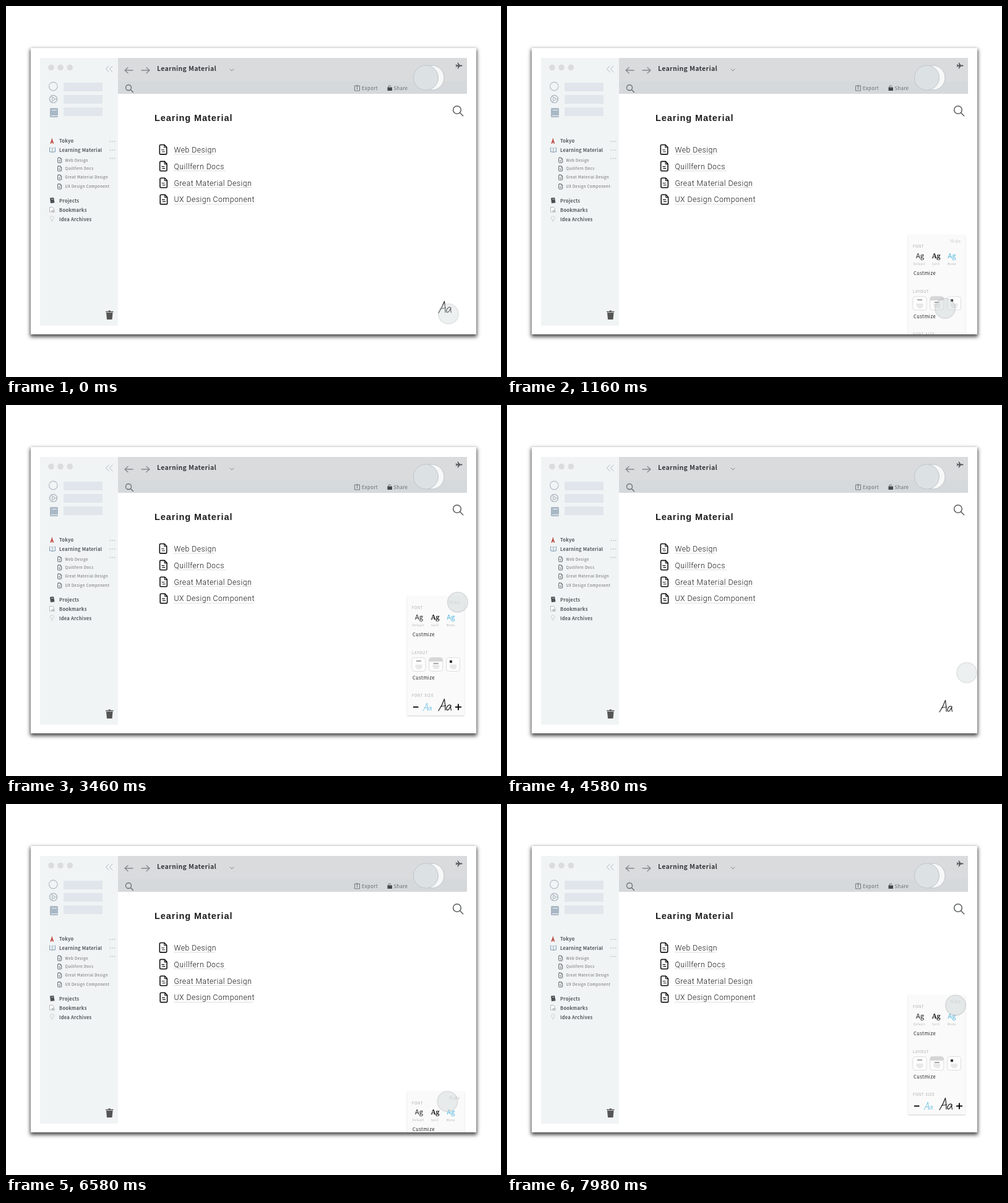
An HTML page that plays this animation: 800x600 px, repeating every 8 s.

```html
<!DOCTYPE html>
<html lang="en">
<head>
<meta charset="utf-8">
<title>Notes app with a type panel</title>
<style>
html, body { margin: 0; width: 100%; height: 100%; overflow: hidden; background: #fff }
svg { position: absolute; left: 0; top: 0; display: block }
text { font-family: "Noto Sans CJK JP", "Noto Sans CJK SC", "Noto Sans CJK", "Noto Sans", sans-serif; white-space: pre }
.window { position: absolute; left: 40px; top: 68px; width: 720px; height: 463px; background: #fff;
  box-shadow: 0 3px 6px 1px rgba(0,0,0,.72) }
.line { fill: none; stroke-linecap: round; stroke-linejoin: round }
.nav { font-size: 7.5px; font-weight: 700; letter-spacing: .27px; fill: #53585b }
.sub { font-size: 6px; letter-spacing: .48px; fill: #666 }
.tool { font-size: 7.6px; letter-spacing: .5px; fill: #62676a }
.item { font: 300 12.2px Roboto, "Liberation Sans", sans-serif; letter-spacing: .5px; fill: #111 }
.label { font-size: 6px; letter-spacing: .65px; fill: #aaa }
.tiny { font-size: 4.4px; letter-spacing: .6px; fill: #aaa }
.custom { font-size: 7.5px; letter-spacing: .5px; fill: #222 }
</style>
</head>
<body>
<div class="window"></div>
<svg width="800" height="600" viewBox="0 0 800 600">
  <defs>
    <clipPath id="stage"><path d="M40 68H760V531H40z"/></clipPath>
    <g id="doc" class="line">
      <path d="M2.5 .8H8.5L12.2 4.8V14.5Q12.2 16.2 10.5 16.2H2.5Q.8 16.2 .8 14.5V2.5Q.8 .8 2.5 .8z" stroke-width="1.6"/>
      <path d="M8.3 1V5H12M4 9H8M5 12H9" stroke-width="1.1"/>
    </g>
    <path id="aa" class="line" stroke-width="1.25"
      d="M0 19Q6 10 9.5 0Q11 9 11 18M3.5 12L11.5 11M20 10.5C16 7.5 11.5 14 13.5 17.5C15.5 19.5 18.5 14 20 10.5Q19 15 20.5 18"/>
    <path id="dots" d="M0 0h1.8m1.8 0h1.8m1.8 0h1.8" stroke="#bfc3c5" stroke-width="1.6"/>
    <filter id="soft" x="-10%" y="-10%" width="120%" height="120%">
      <feDropShadow dx="0" dy="1" stdDeviation="1.3" flood-color="#000" flood-opacity=".2"/>
    </filter>
  </defs>

  <!-- sidebar -->
  <path d="M55 84H181V517H55z" fill="#f1f4f5"/>
  <g fill="#dadcdd"><circle cx="73" cy="99.5" r="4.8"/><circle cx="88" cy="99.5" r="4.8"/><circle cx="103.300" cy="99.5" r="4.8"/></g>
  <path class="line" d="M166 97l-4.500 5 4.500 5m6-10l-4.500 5 4.500 5" stroke="#b2bac0"/>
  <g class="line" stroke="#b4bec6" stroke-width="1.2">
    <circle cx="76.300" cy="130" r="6.8"/>
    <circle cx="76.500" cy="150.500" r="6" stroke-width="1.7"/>
    <circle cx="76.500" cy="150.500" r="2.200"/>
    <path d="M78.500 150.500h4m-7-2l-2.200-3.600m2.200 7.600l-2.200 3.600"/>
  </g>
  <rect x="71" y="165" width="13" height="15" rx="1.500" fill="#a9b8c5"/>
  <path d="M74 168.500h8M73 177.500h11" stroke="#eef2f5"/>
  <path d="M93 124h63v14H93zM93 144h63v14H93zM93 164h63v14H93z" fill="#e0e6ec"/>
  <use href="#dots" x="167.500" y="219"/><use href="#dots" x="167.500" y="233"/><use href="#dots" x="167.500" y="246.500"/>
  <path d="M74.300 213l1 4 2 5.500h-1.800l-1.200-2.500-1.200 2.500h-1.800l2-5.500z" fill="#bd4b42"/>
  <path d="M70 228.500l5 1 5-1v7.500l-5 1-5-1z" fill="#7fa3bf"/>
  <path d="M71 229l4 1 4-1v6l-4 1-4-1z" fill="#eef0ef"/><path d="M75 230v6" stroke="#9baab4"/>
  <path d="M71 310.500l6-.7 1.500 8.500-6.500.7z" fill="#4c5052"/><path d="M73.500 312.500l2.500-.2" stroke="#ddd"/>
  <path d="M70.500 325.500h5l1.500 1.500v6h-6.500z" fill="#fff" stroke="#a3a8aa" stroke-width=".8"/>
  <path d="M73.500 330h5v4h-5z" fill="#c0c5c7"/>
  <path class="line" d="M72.800 345.500C69.500 342 72 340 74.300 340S79 342 75.800 345.500zm.4 2.300h2.200" stroke="#c5c9ca" stroke-width=".9"/>
  <path d="M162 496h10.500l-1 11h-8.500z" fill="#555"/><path d="M161 494.500h12.500M165.500 493.200h3.500" stroke="#555" stroke-width="1.500"/>
  <g id="nav"></g>

  <!-- header -->
  <path d="M181 84H745V122H181z" fill="#d9dbdd"/>
  <path d="M181 122H745V142H181z" fill="#d5d9dc"/>
  <path class="line" d="M205 104h-13l5-4.500m-5 4.500l5 4.500M219 104h13l-5-4.500m5 4.500l-5 4.500" stroke="#84898d" stroke-width="1.300"/>
  <text x="244" y="105" font-size="10.500" font-weight="700" letter-spacing=".33" fill="#36393b">Learning Material</text>
  <path class="line" d="M362 102l3 3 3-3" stroke="#83888b"/>
  <g class="line" stroke="#686d70">
    <circle cx="198" cy="132" r="4.500" stroke-width="1.300"/><path d="M201.500 135.500l4 4" stroke-width="1.400"/>
    <path d="M565.500 129H563.500v8h8v-8h-2M567.500 134.500v-6.500l-1.800 1.800m1.800-1.800l1.800 1.800" stroke-width=".9"/>
    <path d="M618 132v-2a2.200 2.200 0 0 1 4 0"/>
  </g>
  <path d="M616.500 131.500h7.500v5.500h-7.500z" fill="#44484a"/>
  <text class="tool" x="575" y="136">Export</text>
  <text class="tool" x="626.500" y="136" letter-spacing=".2">Share</text>
  <g stroke="#bfc6ca"><circle cx="688" cy="116" r="20" fill="#f7f8f8"/><circle cx="678.500" cy="116" r="20" fill="#dce1e4"/></g>
  <path d="M738 96.500l-1.500-.9h-3l-3-4h-1l1.200 4h-2l-1-1.400h-.9l.6 2.300-.6 2.300h.9l1-1.400h2l-1.200 4h1l3-4h3z" fill="#56595b"/>

  <!-- page -->
  <text x="240" y="185.500" style="font:700 14.500px 'Liberation Sans',Arial,sans-serif" letter-spacing=".95" fill="#1c1c1c">Learing Material</text>
  <g class="line" stroke="#5f6163" stroke-width="1.600"><circle cx="729" cy="168" r="6.300"/><path d="M733.700 172.700l5 5"/></g>
  <g id="list"></g>

  <g clip-path="url(#stage)">
    <use id="button" href="#aa" x="699" y="477.500" stroke="#333"/>
    <g id="panel">
      <path d="M648.500 0H740.500V193H648.500z" fill="#fafafa" filter="url(#soft)"/>
      <text x="716" y="13" font-size="7" letter-spacing=".6" fill="#c8c8c8">Hide</text>
      <text class="label" x="656" y="21">FONT</text>
      <text x="661" y="37.500" font-size="11" fill="#222">Ag</text>
      <text x="686.500" y="37.500" style="font:700 12px 'Noto Serif','Liberation Serif',serif;font-size:11px" fill="#222">Ag</text>
      <text x="712.500" y="37.500" font-size="11" fill="#4fb5de">Ag</text>
      <text class="tiny" x="657" y="48.500">Default</text>
      <text class="tiny" x="687" y="48.500">Serif</text>
      <text class="tiny" x="712" y="48.500">Mono</text>
      <text class="custom" x="657" y="64.500">Custmize</text>
      <text class="label" x="656" y="94">LAYOUT</text>
      <g id="tiles"></g>
      <path d="M683.500 106v-3q0-3.500 3.500-3.500h15q3.500 0 3.500 3.500v3z" fill="#d6d6d6"/>
      <path d="M717 104h4v4h-4z" fill="#333"/>
      <text class="custom" x="657" y="134.500">Custmize</text>
      <text class="label" x="656" y="162.500">FONT SIZE</text>
      <path d="M658 179.500h8.500M726 179.500h10M731 174.500v10" stroke="#111" stroke-width="1.900"/>
      <use href="#aa" transform="translate(674 173) scale(.66)" stroke="#62c0e2"/>
      <use href="#aa" x="699" y="166.500" stroke="#222"/>
    </g>
  </g>
  <g id="cursor">
    <circle r="16.200" fill="#cdd6d8" stroke="#b4b8ba" stroke-width="1.800"/>
  </g>
</svg>
<script>
const $ = id => document.getElementById(id);
const pages = ['Web Design', 'Quillfern Docs', 'Great Material Design', 'UX Design Component'];
const docIcon = (x, y, scale, color) =>
  `<use href="#doc" transform="translate(${x} ${y}) scale(${scale})" stroke="${color}"/>`;
const label = (cls, x, y, text) => `<text class="${cls}" x="${x}" y="${y}">${text}</text>`;

$('nav').innerHTML =
  [['Tokyo', 220.5], ['Learning Material', 235.7], ['Projects', 318], ['Bookmarks', 333], ['Idea Archives', 347.5]]
    .map(([text, y]) => label('nav', 86, y, text)).join('') +
  pages.map((text, i) => {
    const y = [251.5, 265, 279.3, 294][i];
    return docIcon(83.2, y - 6.6, .53, '#4b4f51') + label('sub', 95.5, y, text);
  }).join('');

$('list').innerHTML = pages.map((text, i) => {
  const y = 236.7 + 26.9 * i;
  return docIcon(247.5 + i * .3, y - 13, 1, '#111') + label('item', 271.5, y, text) +
    `<path d="M271 ${y + 3}H${[337, 355, 397, 399][i]}" stroke="#ddd"/>`;
}).join('');

$('tiles').innerHTML = [0, 1, 2].map(i => `<g transform="translate(${656 + i * 27.8} 99.500)">
  <rect width="22" height="22" rx="4" fill="#fdfdfd" stroke="#ddd"/>
  ${i < 2 ? `<path d="M7 ${i ? 9.5 : 5.5}h8" stroke="#777" stroke-width="1.300"/>` : ''}
  <path d="M5.500 12.500h11m-11 2.500h11m-9 2.500h8" stroke="#c4c4c4" stroke-width=".9"/></g>`).join('');

const clamp = v => Math.max(0, Math.min(1, v));
const smooth = p => p * p * (3 - 2 * p);
const easeIn = p => p * p;
const easeOut = p => p * (2 - p);

// time, x, y, easing towards this point
const path = [
  [0, 715, 498], [260, 714, 503, smooth], [820, 708, 489, smooth],
  [2050, 708, 489, smooth], [2440, 730, 319, smooth], [3620, 730, 319, smooth],
  [4420, 743, 430, smooth], [5280, 743, 462, smooth], [5800, 713, 482, smooth],
  [6000, 713, 484, smooth], [6450, 713, 484, smooth],
  [6920, 719, 446, easeIn], [8000, 725, 325.5, easeOut]
];

function cursorAt(t) {
  const i = path.findIndex(k => k[0] > t);
  const a = path[i - 1], b = path[i];
  const p = b[3]((t - a[0]) / (b[0] - a[0]));
  return [a[1] + (b[1] - a[1]) * p, a[2] + (b[2] - a[2]) * p];
}

// critically damped spring, 0 to 1
function spring(ms) {
  const w = .0088 * Math.max(0, ms);
  return 1 - (1 + w) * Math.exp(-w);
}

const OPEN = 865, CLOSE = 3630, REOPEN = 6449;

function draw(now) {
  const t = now % 8000;
  const open = t < REOPEN ? spring(t - OPEN) - spring(t - CLOSE) : spring(t - REOPEN);
  const [x, y] = cursorAt(t);
  $('panel').setAttribute('transform', `translate(0 ${309 + 230 * (1 - open)})`);
  $('button').setAttribute('opacity', t < CLOSE ? 1 - clamp((t - OPEN) / 120)
    : t < REOPEN ? clamp((t - CLOSE - 350) / 250) : 1 - clamp((t - REOPEN) / 120));
  $('cursor').setAttribute('transform', `translate(${x} ${y})`);
  $('cursor').setAttribute('opacity', .36 + .12 * clamp(open));
  requestAnimationFrame(draw);
}
requestAnimationFrame(draw);
</script>
</body>
</html>
```
